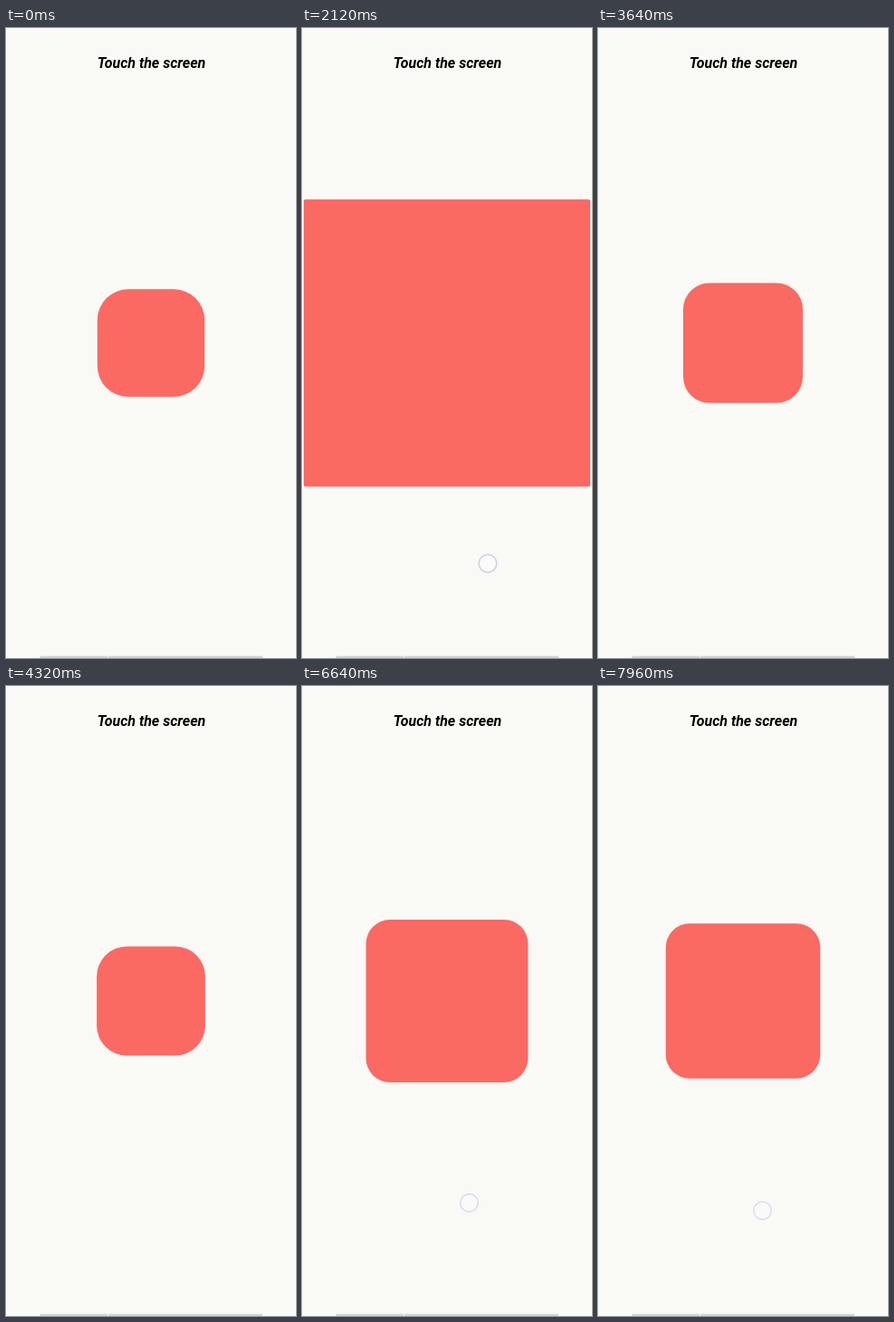
These frames come from a looping animation (320 px wide and 693 px high, 8 s). An HTML page:

```html
<!DOCTYPE html>
<html lang="en">
<head>
<meta charset="utf-8">
<title>Touch the screen</title>
<style>
  html, body { margin: 0; width: 100%; height: 100%; overflow: hidden; background: #f9faf5; }
  svg { display: block; width: 320px; height: 693px; }
  text { font: italic 700 16px Roboto, sans-serif; text-anchor: middle; }
</style>
</head>
<body>
<svg viewBox="0 0 320 693">
  <text x="160.5" y="44">Touch the screen</text>
  <path d="M37.5 692H112M113 692H283" stroke="#d2d3cf" stroke-width="2.4"/>
  <rect id="box" fill="#fb6963"/>
  <circle id="finger" r="9.8" fill="#fbfbfa" stroke="#cbcfe6" stroke-width="1.5"/>
</svg>
<script>
const LOOP = 8000;
const SMALL = 118.4, LARGE = 320, ROUND = 34;
const SIZE_TAU = 300, RADIUS_TAU = 430;
const FINGER_LEAD = 130, FADE = 320;
const touches = [
  { down: 926, up: 2832, x: 205, y: 589 },
  { down: 6534, up: 6938, x: 184.5, y: 568.5 },
  { down: 7881, up: 9000, x: 181.5, y: 577 }
];
const box = document.getElementById('box');
const finger = document.getElementById('finger');
const clamp = v => Math.max(0, Math.min(1, v));

function setAttributes(node, values) {
  for (const name in values) node.setAttribute(name, values[name]);
}

// Exponential approach towards 1 while pressed and towards 0 after release.
function growth(t, tau) {
  let value = 0;
  for (const { down, up } of touches) {
    if (t < down) break;
    const next = touches.find(touch => touch.down > down);
    value = 1 - (1 - value) * Math.exp((down - Math.min(t, up)) / tau);
    if (t > up) value *= Math.exp((up - Math.min(t, next ? next.down : t)) / tau);
  }
  return value;
}

function render(t) {
  const size = SMALL + (LARGE - SMALL) * growth(t, SIZE_TAU);
  setAttributes(box, {
    x: 160 - size / 2, y: 346.5 - size / 2, width: size, height: size,
    rx: ROUND * (1 - growth(t, RADIUS_TAU))
  });

  const touch = touches.findLast(({ down }) => t >= down - FINGER_LEAD);
  const opacity = touch
    ? clamp((t - touch.down + FINGER_LEAD) / FADE) * clamp(1 - (t - touch.up) / FADE)
    : 0;
  setAttributes(finger, { cx: touch ? touch.x : 0, cy: touch ? touch.y : 0, opacity });
}

const start = performance.now();
function tick() {
  render((performance.now() - start) % LOOP);
  requestAnimationFrame(tick);
}
tick();
</script>
</body>
</html>
```
